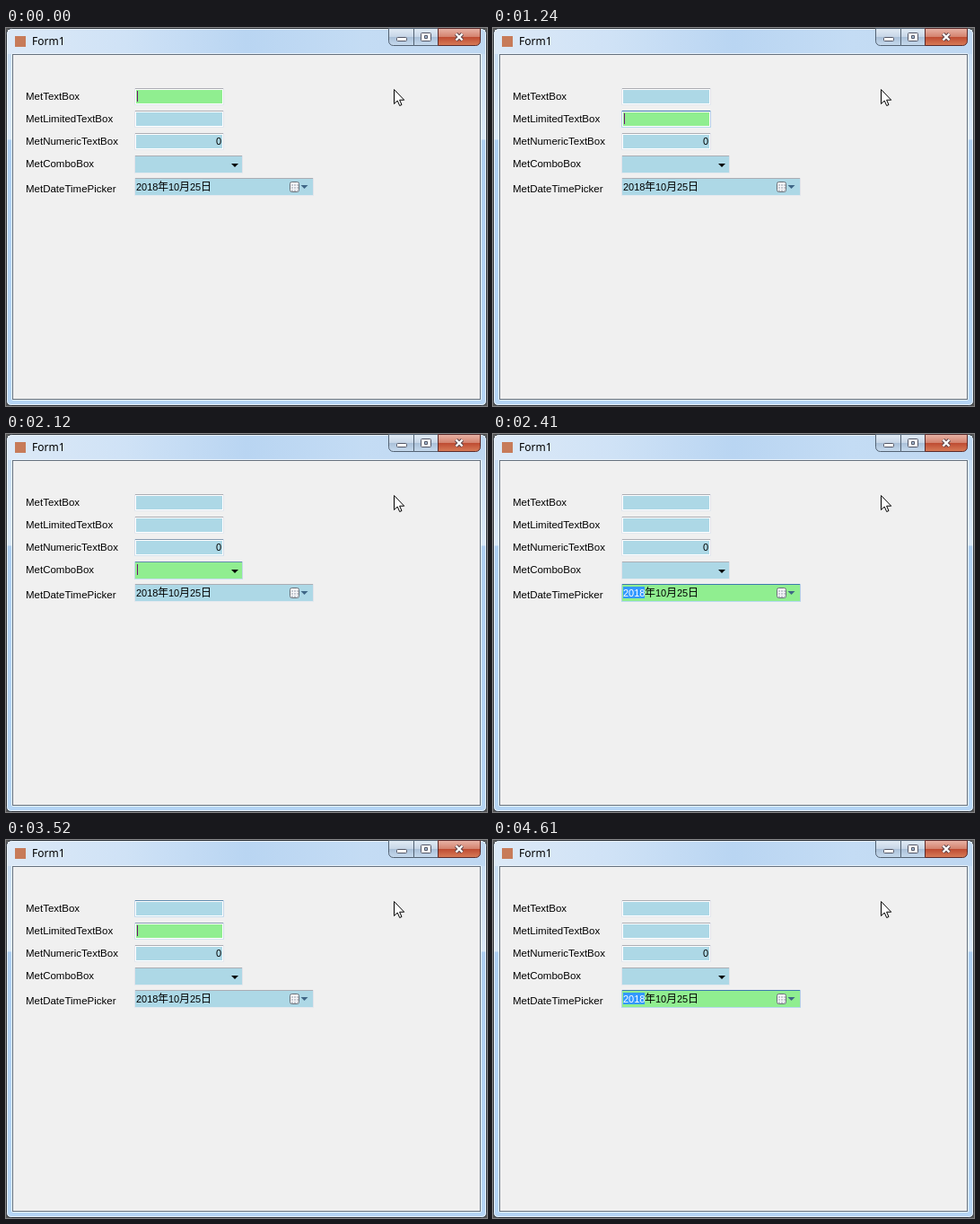
These frames come from a looping animation (536x421 px, 5620 ms). An HTML page with a canvas:

```html
<!DOCTYPE html>
<html lang="ja">
<head>
<meta charset="utf-8">
<title>Form1</title>
<style>
  html, body { margin: 0; width: 100%; height: 100%; overflow: hidden; }
  canvas { display: block; }
</style>
</head>
<body>
<canvas id="stage" width="536" height="421"></canvas>
<script>
const ctx = document.getElementById('stage').getContext('2d');
const LOOP = 5620;
const FADE_STEP = 78;
const SANS = '"Liberation Sans", Arial, sans-serif';
const CJK = '"Noto Sans CJK JP", "Noto Sans CJK", sans-serif';

const fields = [
  { label: 'MetTextBox', y: 67, w: 100, h: 19, baseline: 80, caret: 146 },
  { label: 'MetLimitedTextBox', y: 92, w: 100, h: 19, baseline: 105, caret: 146 },
  { label: 'MetNumericTextBox', y: 117, w: 100, h: 19, baseline: 130, caret: 234 },
  { label: 'MetComboBox', y: 142, w: 121, h: 20, baseline: 155, caret: 146 },
  { label: 'MetDateTimePicker', y: 167, w: 200, h: 20, baseline: 183 }
];

// Focus changes; the border glow takes `steps` discrete steps (0 = no glow).
const focusEvents = [
  { at: 0, field: 0, steps: 0 },
  { at: 1000, field: 1, steps: 3 },
  { at: 1570, field: 2, steps: 3 },
  { at: 1950, field: 3, steps: 3 },
  { at: 2410, field: 4, steps: 1, instant: true },
  { at: 2970, field: 0, steps: 2 },
  { at: 3420, field: 1, steps: 3 },
  { at: 3820, field: 2, steps: 3 },
  { at: 4200, field: 3, steps: 3 },
  { at: 4610, field: 4, steps: 1, instant: true }
];

function rect(x, y, w, h, fill) {
  ctx.fillStyle = fill;
  ctx.fillRect(x, y, w, h);
}

function text(str, x, y, font, fill = '#000', align = 'left') {
  ctx.font = font;
  ctx.fillStyle = fill;
  ctx.textAlign = align;
  ctx.fillText(str, x, y);
}

function shape(points, fill, stroke) {
  ctx.beginPath();
  points.forEach(([x, y]) => ctx.lineTo(x, y));
  ctx.closePath();
  ctx.fillStyle = fill;
  ctx.fill();
  if (stroke) {
    ctx.strokeStyle = stroke;
    ctx.lineWidth = 1;
    ctx.stroke();
  }
}

function rounded(x, y, w, h, radii, fill, stroke) {
  ctx.beginPath();
  ctx.roundRect(x, y, w, h, radii);
  if (fill) { ctx.fillStyle = fill; ctx.fill(); }
  if (stroke) { ctx.strokeStyle = stroke; ctx.lineWidth = 1; ctx.stroke(); }
}

function gradient(x0, y0, x1, y1, ...stops) {
  const g = ctx.createLinearGradient(x0, y0, x1, y1);
  stops.forEach(([at, color]) => g.addColorStop(at, color));
  return g;
}

function mix(a, b, p) {
  return `rgb(${a.map((v, i) => Math.round(v + (b[i] - v) * p))})`;
}

function drawWindow() {
  rect(0, 0, 536, 421, '#555');
  rounded(0.5, 0.5, 535, 420, [6, 6, 5, 5],
    gradient(0, 0, 0, 421, [0, '#bdd6f0'], [0.07, '#c9def4'], [0.294, '#dbe9f8'],
      [0.297, '#aecff3'], [0.6, '#b2d2f4'], [1, '#b5d5f5']), '#30363d');
  rect(2, 2, 532, 27, gradient(2, 0, 534, 0, [0, '#dce9f7'], [0.25, '#cfe2f6'],
    [0.5, '#b9d5f2'], [0.75, '#c4dcf4'], [1, '#bed7f1']));
  rounded(1.5, 1.5, 533, 418, [5, 5, 4, 4], null, 'rgba(255,255,255,.7)');
  rounded(6.5, 28.5, 523, 386, 1, null, 'rgba(240,248,255,.85)');
  rect(7, 29, 522, 385, '#65717e');
  rect(8, 30, 520, 383, '#f0f0f0');
  rect(10, 9, 12, 12, '#c77b59');
  text('Form1', 29, 19, '12px "Noto Sans", sans-serif');
  drawCaptionButtons();
}

function drawCaptionButtons() {
  const pale = gradient(0, 1, 0, 19, [0, '#e1ebf5'], [0.48, '#c7d6e7'],
    [0.5, '#a9bfd7'], [1, '#c5d9ed']);
  const red = gradient(0, 1, 0, 19, [0, '#e8b2a5'], [0.48, '#d4836f'],
    [0.5, '#bd4a31'], [1, '#d77a57']);
  rounded(426.5, 0.5, 28, 19, [0, 0, 0, 5], pale, '#536273');
  rounded(454.5, 0.5, 27, 19, 0, pale, '#536273');
  rounded(481.5, 0.5, 47, 19, [0, 0, 5, 0], red, '#5b2b2b');
  rounded(435.5, 10.5, 11, 4, 1, '#fff', '#535666');
  rounded(462.5, 5.5, 11, 9, 1, '#fff', '#535666');
  rounded(466.5, 8.5, 3, 3, 0, '#a9bfd7', '#535666');
  for (const [color, width] of [['#5d4449', 4.5], ['#fff', 2.4]]) {
    ctx.beginPath();
    ctx.moveTo(501.5, 6.5); ctx.lineTo(508.5, 13.5);
    ctx.moveTo(508.5, 6.5); ctx.lineTo(501.5, 13.5);
    ctx.strokeStyle = color;
    ctx.lineWidth = width;
    ctx.stroke();
  }
}

function drawField(index, focused, glow, caretOn) {
  const { label, y, w, h, baseline, caret } = fields[index];
  const x = 143;
  const pad = index < 3 ? 2 : 1;
  text(label, 22, baseline, `11.5px ${SANS}`);
  rect(x, y, w, h, mix([226, 227, 234], [181, 207, 231], glow));
  rect(x, y + h - 1, w, 1, mix([227, 233, 239], [183, 217, 237], glow));
  rect(x + 1, y, w - 2, 1, mix([171, 173, 179], [61, 123, 173], glow));
  rect(x + 1, y + 1, w - 2, h - 2, '#fff');
  rect(x + pad, y + pad, w - 2 * pad, h - 2 * pad, focused ? '#90ee90' : '#add8e6');

  if (index === 2) text('0', 240, 130, `11px ${SANS}`, '#000', 'right');
  if (index === 3) shape([[251, 151], [259, 151], [255, 155]], '#000');
  if (index === 4) drawDate(focused);
  if (focused && caretOn && caret) rect(caret, y + 3, 1, 12, '#6f116f');
}

function drawDate(focused) {
  if (focused) rect(145, 170, 24, 13, '#3399ff');
  text('2018', 145, 181, `11px ${SANS}`, focused ? '#fff' : '#000');
  text('10', 181, 181, `11px ${SANS}`);
  text('25', 205, 181, `11px ${SANS}`);
  [['年', 169], ['月', 193], ['日', 217]].forEach(([char, x]) =>
    text(char, x, 181, `12px ${CJK}`));

  rounded(316.5, 171.5, 10, 11, 2, '#f8f8fa', '#697078');
  for (let row = 0; row < 3; row++) {
    for (let col = 0; col < 3; col++) {
      rect(318 + col * 3, 174 + row * 3, 2, 2, '#c3c8d0');
    }
  }
  shape([[328.5, 175], [336.5, 175], [332.5, 179]], '#3f6686');
}

function drawPointer() {
  shape([[432.5, 68.5], [432.5, 84.5], [436.2, 81], [438.7, 86.5], [441, 85.5],
    [438.6, 80.2], [443.7, 80.2]], '#fff', '#000');
}

function render(t) {
  const current = focusEvents.findLastIndex(event => event.at <= t);
  const event = focusEvents[current];
  const previous = focusEvents[current - 1];
  const step = event.instant ? 1 : Math.floor((t - event.at) / FADE_STEP);
  const progress = event.steps ? Math.min(1, step / event.steps) : 0;
  const startGlow = previous && previous.steps ? 1 : 0;
  const caretOn = t < 230 || t >= 680;

  drawWindow();
  fields.forEach((_, i) => {
    const focused = i === event.field;
    const leaving = previous && i === previous.field;
    const glow = focused ? progress : leaving ? startGlow * (1 - progress) : 0;
    drawField(i, focused, glow, caretOn);
  });
  drawPointer();
}

function frame() {
  render(performance.now() % LOOP);
  requestAnimationFrame(frame);
}
frame();
</script>
</body>
</html>
```
